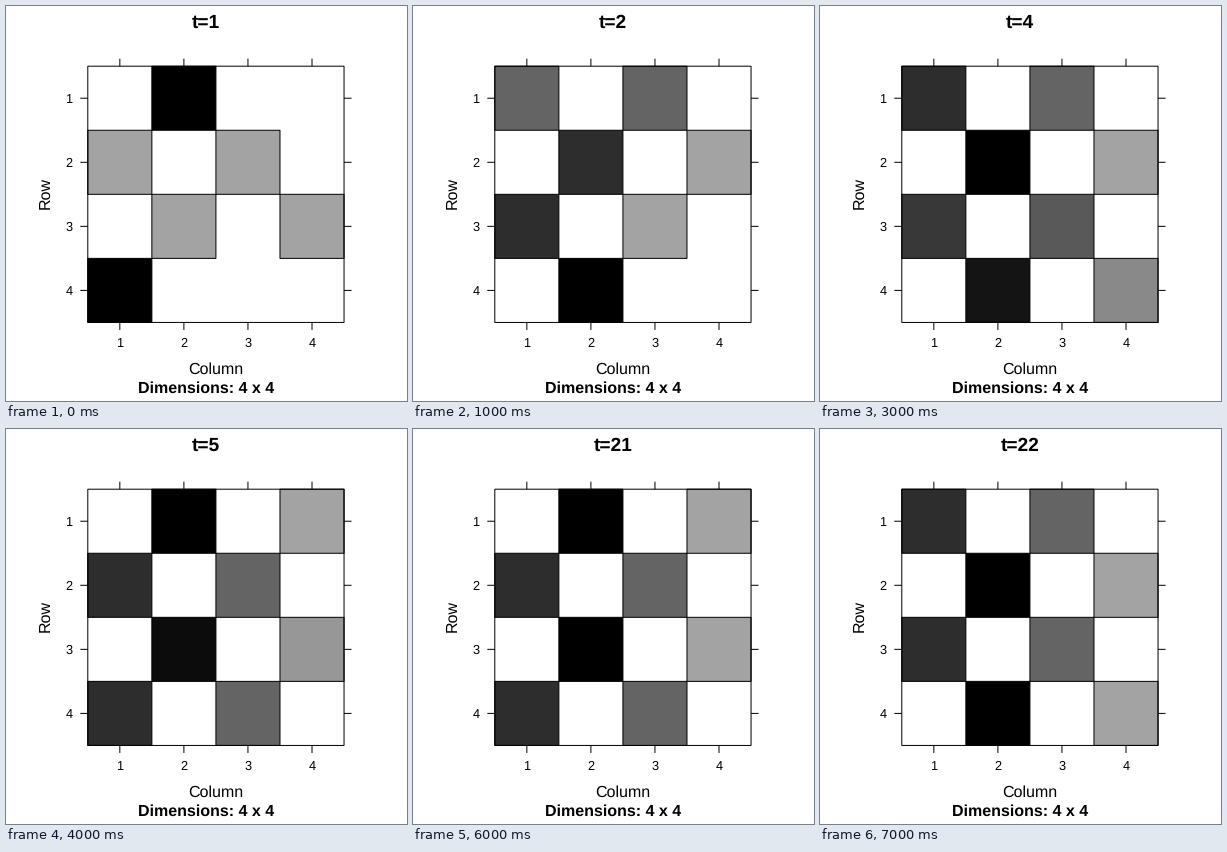
Animation of 401x395 px, one loop 8000 ms. Source, as a matplotlib script:

```python
import numpy as np
import matplotlib.pyplot as plt
from matplotlib.animation import FuncAnimation
from matplotlib.patches import Rectangle

plt.rcParams["font.family"] = "Liberation Sans"
plt.rcParams["text.hinting"] = "none"

W, H, DPI = 401, 395, 100
PT = 72 / DPI                      # points per pixel
LEFT, TOP, CELL, N = 81.8, 60.2, 64.06, 4
SIDE = CELL * N
TICK = 7.5
STEPS = [1, 2, 3, 4, 5, 20, 21, 22]

# Transition matrix of a Markov chain; each picture shows one of its powers
P = np.array([[0, 1, 0, 0],
              [.5, 0, .5, 0],
              [0, .5, 0, .5],
              [1, 0, 0, 0]])

fig = plt.figure(figsize=(W / DPI, H / DPI), dpi=DPI, facecolor="white")
ax = fig.add_axes([0, 0, 1, 1])
ax.set_xlim(0, W)
ax.set_ylim(H, 0)
ax.axis("off")


def grey(u):
    """Shade for a value scaled to 0..1: 16 bins, darker for larger."""
    level = int((u + .04) / 1.08 * 16 + 1e-9)
    g = .7 * (1 - level * 99 // 15 / 99)
    linear = g / 12.92 if g <= .04045 else ((g + .055) / 1.055) ** 2.4
    return str(linear ** (1 / 1.8))


def label(x, y, text, size=16, **kw):
    return ax.text(x, y, text, fontsize=size * PT, color="black",
                   **{"ha": "center", "va": "baseline", **kw})


def line(xs, ys):
    ax.plot(xs, ys, color="black", lw=PT, solid_capstyle="butt", snap=False)


def box(x, y, size, **kw):
    return ax.add_patch(Rectangle((x, y), size, size, ec="black", lw=PT,
                                  snap=False, **kw))


cells = [[box(LEFT + c * CELL, TOP + r * CELL, CELL) for c in range(N)]
         for r in range(N)]
box(LEFT, TOP, SIDE, fill=False, zorder=3)

for k in range(N):
    x = LEFT + (k + .5) * CELL
    y = TOP + (k + .5) * CELL
    line([x, x], [TOP - TICK, TOP])
    line([x, x], [TOP + SIDE, TOP + SIDE + TICK])
    line([LEFT - TICK, LEFT], [y, y])
    line([LEFT + SIDE, LEFT + SIDE + TICK], [y, y])
    label(x, 341, str(k + 1), 12.8)
    label(66.5, y + 4.5, str(k + 1), 12.8, ha="right")

title = label(200, 22, "", 19.2, weight="bold")
label(LEFT + SIDE / 2, 368, "Column")
label(200, 387, "Dimensions: 4 x 4", weight="bold")
label(44, 186.5, "Row", rotation=90, rotation_mode="anchor")


def draw(i):
    t = STEPS[i]
    m = np.linalg.matrix_power(P, t)
    lo, hi = m[m > 0].min(), m.max()
    title.set_text(f"t={t}")
    for r in range(N):
        for c in range(N):
            cells[r][c].set_visible(m[r, c] > 0)
            if m[r, c] > 0:
                cells[r][c].set_facecolor(grey((m[r, c] - lo) / (hi - lo)))
    return []


anim = FuncAnimation(fig, draw, frames=len(STEPS), interval=1000,
                     init_func=lambda: draw(0), repeat=True, repeat_delay=0)
plt.show()
```
